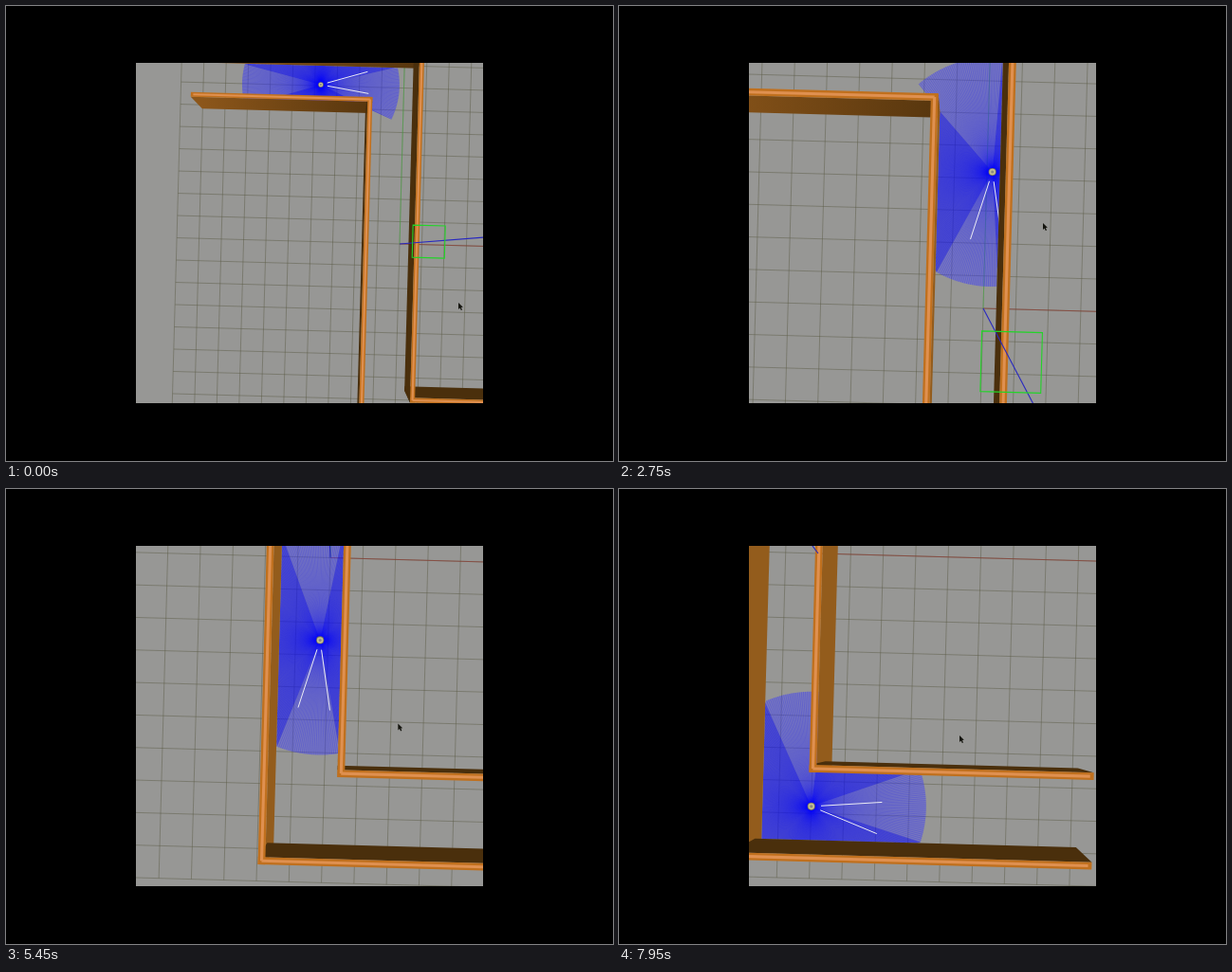
These frames come from a looping animation (640x480 px, 8 s). An HTML page with a canvas:

```html
<!DOCTYPE html>
<html lang="en">
<head>
<meta charset="utf-8">
<title>Robot in a corridor</title>
<style>
html, body { margin: 0; width: 100%; height: 100%; overflow: hidden; background: #000; }
canvas { display: block; width: 640px; height: 480px; }
</style>
</head>
<body>
<canvas id="stage" width="640" height="480"></canvas>
<script>
const ctx = document.getElementById('stage').getContext('2d');
const LOOP = 8000, STEP = 50, RAD = Math.PI / 180;
const VIEW = { x: 137, y: 60, w: 366, h: 359 };
const NADIR = { x: 351, y: 256 };   // point straight below the camera
const TILT = 0.0275;
const WALL_Z = 0.0033, LIGHT_Z = 0.0138, SKY_Z = 0.026;
const RANGE = 3.53, HALF = 0.1;

// where the world origin and the pointer are on screen
const VIEWS = [
  { ms: 0, x: 415, y: 251, px: 477, py: 313 },
  { ms: 1300, x: 407, y: 364, px: 459, py: 255 },
  { ms: 2750, x: 384, y: 319, px: 447, py: 229 },
  { ms: 4000, x: 377, y: 202.5, px: 440, py: 246 },
  { ms: 5100, x: 342, y: 72.5, px: 411, py: 247 },
  { ms: 6000, x: 342, y: 72.5, px: 417, py: 248 },
  { ms: 6500, x: 321.5, y: 72.5, px: 405, py: 250 },
  { ms: 7650, x: 210, y: 68, px: 359, py: 260 }
];
const DRAGS = [[1150, 1500], [6150, 6700]];

// the drive: straight, right bend, straight, left bend (metres, degrees)
const START = { u: -3.73, v: -7.05, deg: -4 };
const DRIVE = [
  { ms: 1057, length: 2.43, turn: 0 },
  { ms: 1106, length: 2.49, turn: 97.5 },
  { ms: 5125, length: 12.83, turn: 0 },
  { ms: 670, length: 0.93, turn: -86.5 }
];

const OUTER = [[-9.92, -8], [0.5, -8], [0.5, 6.48], [8.06, 6.48]];
const INNER = [[-8.92, -5.93], [-1.6, -5.93], [-1.6, 8.92], [8.07, 8.92]];
const WALLS = [OUTER, INNER].flatMap(corners => corners.slice(1).map((q, i) => {
  const p = corners[i];
  return { l: p[0] - HALF, t: p[1] - HALF, r: q[0] + HALF, b: q[1] + HALF };
}));

let cam;

function viewAt(t) {
  const i = VIEWS.findIndex(v => v.ms > t);
  if (i < 0) return VIEWS[VIEWS.length - 1];
  const a = VIEWS[i - 1], b = VIEWS[i];
  const f = (t - a.ms) / (b.ms - a.ms);
  const mix = key => a[key] + (b[key] - a[key]) * f;
  return { x: mix('x'), y: mix('y'), px: mix('px'), py: mix('py') };
}

function zoomAt(t) {
  return Math.min(34.3, 23.5 * Math.exp(t * 0.0001375));
}

function robotAt(t) {
  let { u, v, deg } = START;
  for (const { ms, length, turn } of DRIVE) {
    const f = Math.min(1, Math.max(0, t / ms));
    const half = turn * f / 2 * RAD;
    const chord = length * f * (half ? Math.sin(half) / half : 1);
    u += chord * Math.cos(deg * RAD + half);
    v += chord * Math.sin(deg * RAD + half);
    deg += turn * f;
    t -= ms;
  }
  return { u, v, deg };
}

function project(u, v, z = 0) {
  const { x, y, s } = cam;
  const c = Math.cos(TILT) * s, n = Math.sin(TILT) * s;
  const k = 1 / (1 - z * s);
  return [
    NADIR.x + (x + u * c - v * n - NADIR.x) * k,
    NADIR.y + (y + u * n + v * c - NADIR.y) * k
  ];
}

function path(points, close) {
  ctx.beginPath();
  points.forEach(p => ctx.lineTo(p[0], p[1]));
  if (close) ctx.closePath();
}

function line(points, color, width = 1, close = false) {
  path(points, close);
  ctx.strokeStyle = color;
  ctx.lineWidth = width;
  ctx.stroke();
}

function fill(points, color) {
  path(points, true);
  ctx.fillStyle = color;
  ctx.fill();
}

function disc(x, y, r, color) {
  ctx.beginPath();
  ctx.arc(x, y, r, 0, Math.PI * 2);
  ctx.fillStyle = color;
  ctx.fill();
}

function drawGround() {
  ctx.fillStyle = '#979795';
  ctx.fillRect(VIEW.x, VIEW.y, VIEW.w, VIEW.h);
  for (let i = -10; i <= 10; i++) {
    line([project(i, -10), project(i, 10)], 'rgba(88,88,66,.45)');
    line([project(-10, i), project(10, i)], 'rgba(88,88,66,.45)');
  }
  line([project(0, 0), project(20, 0)], 'rgba(140,60,50,.7)');
  line([project(0, 0), project(0, -20)], 'rgba(60,190,60,.45)');
}

// distance from (u, v) along (du, dv) to a wall box
function hitBox(u, v, du, dv, w) {
  const x1 = (w.l - u) / du, x2 = (w.r - u) / du;
  const y1 = (w.t - v) / dv, y2 = (w.b - v) / dv;
  const near = Math.max(Math.min(x1, x2), Math.min(y1, y2));
  const far = Math.min(Math.max(x1, x2), Math.max(y1, y2));
  return near <= far && near > 0 ? near : Infinity;
}

function drawScan(u, v) {
  const center = project(u, v);
  const rays = [];
  for (let i = 0; i < 360; i++) {
    const a = (i + 0.5) * RAD;
    const du = Math.cos(a), dv = Math.sin(a);
    const d = Math.min(RANGE, ...WALLS.map(w => hitBox(u, v, du, dv, w)));
    rays.push({ end: project(u + du * d, v + dv * d), hit: d < RANGE });
  }
  const sector = hit => rays.map((r, i) =>
    r.hit === hit || rays[(i + 1) % 360].hit === hit ? r.end : center);
  fill(sector(true), 'rgba(15,15,250,.55)');
  fill(sector(false), 'rgba(70,70,255,.38)');
  rays.forEach(r => line([center, r.end], 'rgba(10,10,250,.22)', 0.9));
}

function drawFrustum(u, v, deg, closed) {
  const at = (offset, d) => {
    const a = (deg + offset) * RAD;
    return project(u + Math.cos(a) * d, v + Math.sin(a) * d);
  };
  [-13, 13].forEach(o => line([at(o, 0.3), at(o, 2.18)], '#ececf4'));
  if (closed) line([at(-13, 2.18), at(13, 2.18)], '#4a3418', 1.5);
}

function sideFill(name, a, b) {
  if (name === 'left' || name === 'up') return '#4a2f0c';
  if (name === 'right') return '#935c1c';
  const g = ctx.createLinearGradient(a[0], a[1], b[0], b[1]);
  g.addColorStop(0, '#8c561a');
  g.addColorStop(1, '#57360e');
  return g;
}

function drawSides({ l, t, r, b }) {
  const sides = {
    left: [[l, t], [l, b], NADIR.x < project(l, (t + b) / 2)[0]],
    right: [[r, t], [r, b], NADIR.x > project(r, (t + b) / 2)[0]],
    up: [[l, t], [r, t], NADIR.y < project((l + r) / 2, t)[1]],
    down: [[l, b], [r, b], NADIR.y > project((l + r) / 2, b)[1]]
  };
  for (const [name, [p, q, visible]] of Object.entries(sides)) {
    if (!visible) continue;
    const a = project(...p), c = project(...q);
    fill([a, c, project(...q, WALL_Z), project(...p, WALL_Z)], sideFill(name, a, c));
  }
}

function drawWalls() {
  WALLS.forEach(drawSides);
  for (const { l, t, r, b } of WALLS) {
    fill([[l, t], [r, t], [r, b], [l, b]].map(p => project(...p, WALL_Z)), '#c0701e');
  }
  for (const { l, t, r, b } of WALLS) {
    const ends = [[l + HALF, t + HALF], [r - HALF, b - HALF]];
    line(ends.map(p => project(...p, WALL_Z)), '#df9050', cam.s * 0.09);
  }
}

function drawLight() {
  line([project(0, 0), project(0, 0, SKY_Z)], '#2828c0', 1.1);
  const h = 0.49;
  const box = [[-h, -h], [h, -h], [h, h], [-h, h]].map(p => project(...p, LIGHT_Z));
  line(box, '#22d428', 1.1, true);
}

function drawRobot(u, v) {
  const [x, y] = project(u, v);
  const r = cam.s * 0.12;
  disc(x, y, r, '#6e6c5c');
  disc(x, y, r * 0.8, '#c4be90');
  disc(x, y, r * 0.38, '#8c8a80');
}

function drawPointer(x, y, dragging) {
  if (dragging) disc(x + 5, y, 6, '#d0cc24');
  const arrow = [[0, 0], [0, 7], [1.6, 5.5], [2.8, 8], [4, 7.4], [2.9, 5], [4.8, 4.8]];
  fill(arrow.map(p => [x + p[0], y + p[1]]), '#14140e');
}

function draw(t) {
  const { x, y, px, py } = viewAt(t);
  cam = { x, y, s: zoomAt(t) };
  const { u, v, deg } = robotAt(t);
  const dragging = DRAGS.some(([from, to]) => t >= from && t < to);
  ctx.fillStyle = '#000';
  ctx.fillRect(0, 0, 640, 480);
  ctx.save();
  ctx.beginPath();
  ctx.rect(VIEW.x, VIEW.y, VIEW.w, VIEW.h);
  ctx.clip();
  drawGround();
  drawScan(u, v);
  drawFrustum(u, v, deg, dragging);
  drawWalls();
  drawLight();
  drawRobot(u, v);
  drawPointer(px, py, dragging);
  ctx.restore();
}

const start = performance.now();
function tick() {
  const t = (performance.now() - start) % LOOP;
  draw(Math.floor(t / STEP) * STEP);
  requestAnimationFrame(tick);
}
tick();
</script>
</body>
</html>
```
